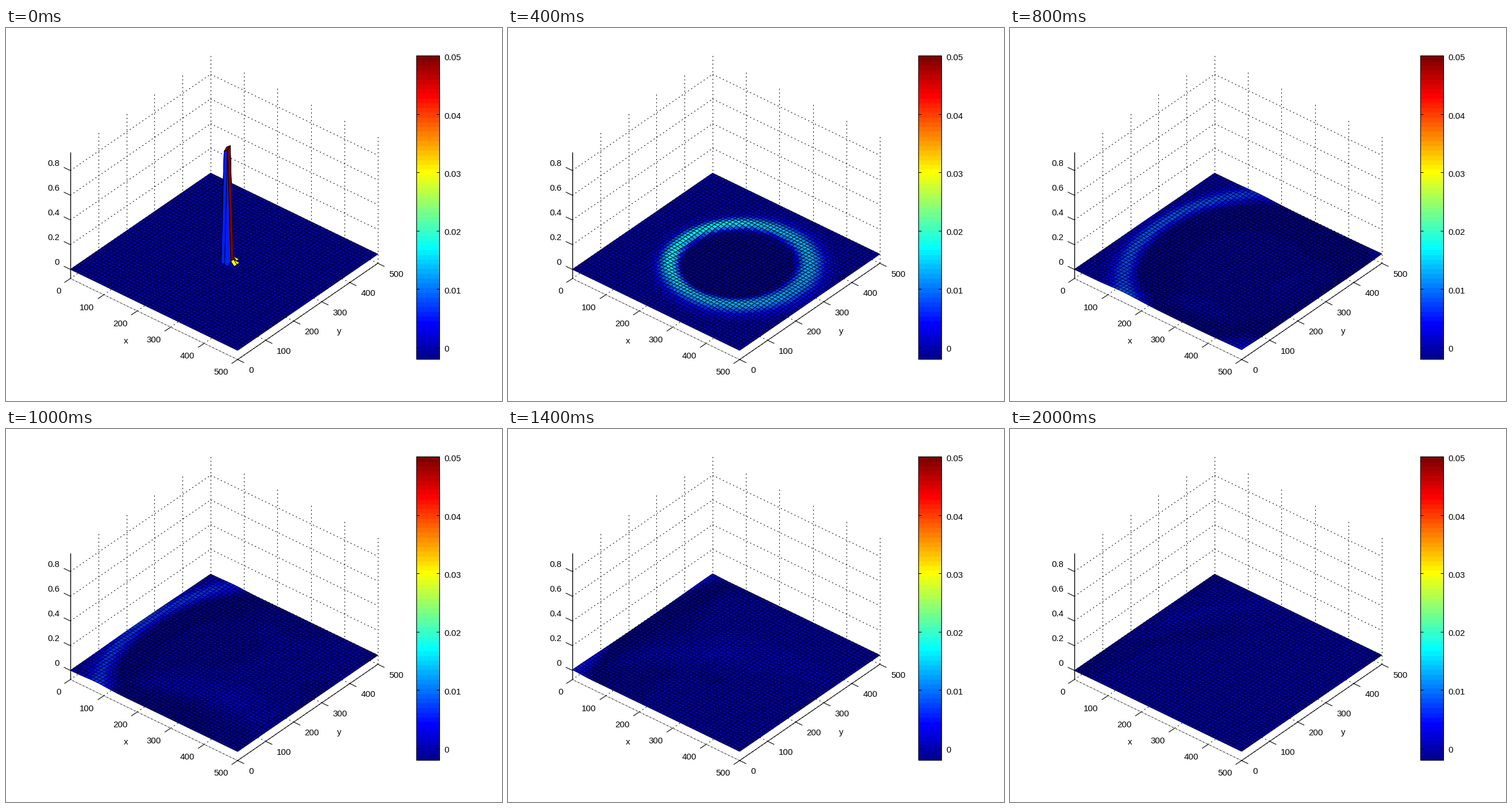
Write a matplotlib script that moves like this. It is 863x649 px and loops after 2100 ms.

```python
import numpy as np
import matplotlib.pyplot as plt
from matplotlib.animation import FuncAnimation
from matplotlib.collections import LineCollection, PolyCollection

W, H, DPI = 863, 649, 72
FRAMES, SUBSTEPS = 21, 20
N, CELL = 51, 10.0
Z_LOW, Z_HIGH = -0.074, 0.949
C_LOW, C_HIGH = -0.002, 0.05

plt.rcParams["font.family"] = "Liberation Sans"
plt.rcParams["font.size"] = 15


def project(x, y, z):
    """Parallel projection from data space to stage pixels."""
    return np.stack([112 + 0.582 * x + 0.488 * y,
                     420 + 0.282 * x - 0.335 * y - 215 * z], axis=-1)


def jet64():
    i = np.arange(64)
    return np.stack([np.clip((24 - abs(i - c)) / 16, 0, 1) for c in (47, 31, 15)], 1)


JET = jet64()


def colour(v):
    i = np.floor((v - C_LOW) / (C_HIGH - C_LOW) * 64).astype(int)
    return JET[np.clip(i, 0, 63)]


def laplacian(a):
    p = np.pad(a, 1, mode="edge")
    return (p[2:, 1:-1] + p[:-2, 1:-1] + p[1:-1, 2:] + p[1:-1, :-2] - 4 * a) / CELL**2


def wave_speed(x):
    """Speed over a bed that deepens linearly from the beach at x = 0."""
    return np.sqrt(60 + 5 * np.maximum(x, 0))


def viscosity(c):
    return (25 + 1.4 * c)[:, None]


def simulate():
    """Linear shallow-water wave; open edges, the one at y = 0 partly reflecting."""
    x = np.arange(N) * CELL
    c = wave_speed(x)
    c_face = wave_speed(np.arange(N + 1) * CELL - CELL / 2)
    c2, c2_face = c[:, None] ** 2, c_face[1:-1, None] ** 2
    visc, visc_face = viscosity(c), viscosity(c_face)
    dt = 1 / SUBSTEPS
    drop = np.zeros(N)
    drop[24:28] = 0.006, 0.945, 0.968, 0.031
    h = np.outer(drop, drop)
    qx, qy = np.zeros((N + 1, N)), np.zeros((N, N + 1))
    states = [h.copy()]
    for _ in range(FRAMES - 1):
        for _ in range(SUBSTEPS):
            qx += dt * visc_face * laplacian(qx)
            qy += dt * visc * laplacian(qy)
            qx[1:-1] -= dt * c2_face * np.diff(h, axis=0) / CELL
            qy[:, 1:-1] -= dt * c2 * np.diff(h, axis=1) / CELL
            qx[0], qx[-1] = -c[0] * h[0], c[-1] * h[-1]
            qy[:, 0], qy[:, -1] = -0.5 * c * h[:, 0], c * h[:, -1]
            flow = (np.diff(qx, axis=0) + np.diff(qy, axis=1)) / CELL
            h = h + dt * (visc * laplacian(h) - flow)
        states.append(h.copy())
    return states


STATES = simulate()
GX, GY = np.meshgrid(np.arange(N) * CELL, np.arange(N) * CELL, indexing="ij")

fig = plt.figure(figsize=((W + 0.001) / DPI, (H + 0.001) / DPI), dpi=DPI, facecolor="white")
ax = fig.add_axes([0, 0, 1, 1])
ax.set_xlim(0, W)
ax.set_ylim(H, 0)
ax.axis("off")


def lines(segs, width=1.0, color="black", style="solid", z=1):
    ax.add_collection(LineCollection(segs, linewidths=width, colors=color,
                                     linestyles=style, zorder=z))


def seg(a, b):
    return [project(*a), project(*b)]


def tick(p, dx, dy):
    return [p, p + (dx, dy)]


def label(x, yc, s, ha):
    ax.text(x, yc + 5.4, s, ha=ha, va="baseline")


# Dotted grid on the floor and both back walls
dots, ticks = [], []
for v in range(0, 501, 100):
    dots += [seg((v, 0, Z_LOW), (v, 500, Z_LOW)),
             seg((500, v, Z_LOW), (0, v, Z_LOW))]
    if v:
        dots.append(seg((0, v, Z_LOW), (0, v, Z_HIGH)))
        dots.append(seg((v, 500, Z_LOW), (v, 500, Z_HIGH)))
    px, py = project(v, 0, Z_LOW), project(500, v, Z_LOW)
    ticks += [tick(px, -10.5, 7), tick(py, 11.5, 5.5)]
    label(px[0] - 16.5, px[1] + 21, str(v), "right")
    label(py[0] + 19, py[1] + 18, str(v), "left")
for k in range(5):
    z = k / 5
    dots += [seg((0, 0, z), (0, 500, z)), seg((0, 500, z), (500, 500, z))]
    p = project(0, 0, z)
    ticks.append(tick(p, -11.5, -5.5))
    label(93, p[1] - 13, f"{z:.1f}" if k else "0", "right")
lines(dots, 1.1, style=(0, (1.8, 4.2)))
lines(ticks, 1.1)
lines([seg((0, 0, Z_LOW), (500, 0, Z_LOW))], 0.5, "0.3")
lines([seg((500, 0, Z_LOW), (500, 500, Z_LOW))], 1.1)
lines([seg((0, 0, Z_LOW), (0, 0, Z_HIGH))], 1.4, z=4)
ax.text(209, 549, "x", ha="center")
ax.text(580, 532, "y", ha="center")

# Colour bar
LEFT, RIGHT, TOP, BOTTOM = 714, 754, 48.5, 576
edges = np.linspace(BOTTOM, TOP, 65)
bands = [[(LEFT, a), (RIGHT, a), (RIGHT, b), (LEFT, b)]
         for a, b in zip(edges[:-1], edges[1:])]
ax.add_collection(PolyCollection(bands, facecolors=JET, edgecolors=JET,
                                 linewidths=0.3, zorder=2))
marks = []
for k in range(6):
    v = k / 100
    y = BOTTOM - (v - C_LOW) / (C_HIGH - C_LOW) * (BOTTOM - TOP)
    marks += [[(LEFT, y), (LEFT + 5, y)], [(RIGHT - 5, y), (RIGHT, y)]]
    label(762, y + 2.2, f"{v:.2f}" if k else "0", "left")
frame = [(LEFT, TOP), (RIGHT, TOP), (RIGHT, BOTTOM), (LEFT, BOTTOM), (LEFT, TOP)]
lines(marks + [frame], 1.1, z=3)

surface = PolyCollection([], edgecolors="black", linewidths=0.85,
                         joinstyle="round", zorder=3)
ax.add_collection(surface)


def update(i):
    h = STATES[i]
    p = project(GX, GY, h)
    quads = np.stack([p[:-1, :-1], p[1:, :-1], p[1:, 1:], p[:-1, 1:]], axis=2)
    # Paint from the far corner to the near one
    surface.set_verts(quads[:, ::-1].reshape(-1, 4, 2))
    surface.set_facecolor(colour(h[:-1, :-1])[:, ::-1].reshape(-1, 3))
    return [surface]


anim = FuncAnimation(fig, update, frames=FRAMES, interval=100, repeat=True)
plt.show()
```
